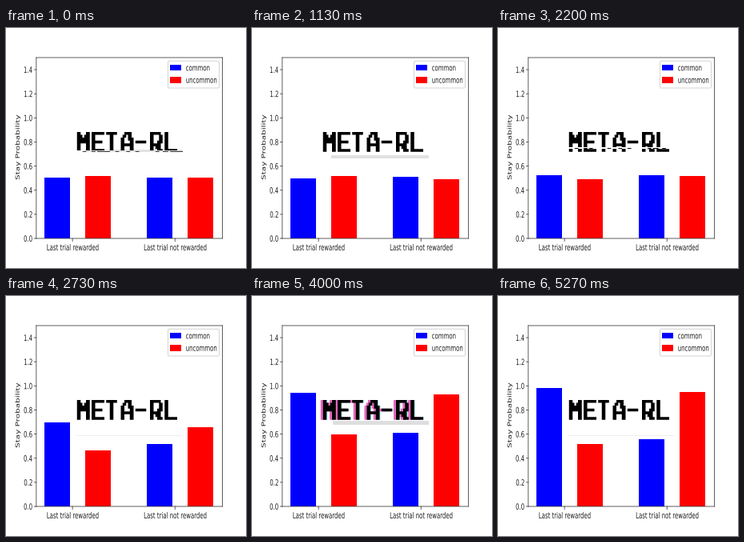
A matplotlib script for the animation above (5340 ms loop, 300 px wide and 300 px high).

```python
import numpy as np
import matplotlib.pyplot as plt
from matplotlib.animation import FuncAnimation
from matplotlib.patches import FancyBboxPatch, PathPatch, Rectangle
from matplotlib.textpath import TextPath
from matplotlib.transforms import Affine2D

LOOP, TICK, STEPS = 5340, 20, 80
W, H = 432, 288                      # a 3:2 chart shown on a square stage
SX, SY = W / 300, H / 300            # chart units per stage pixel
LEFT, RIGHT, BOTTOM, TOP = 54.5, 389.5, 35.5, 252.5
UNIT = (TOP - BOTTOM) / 1.5          # height of probability 1
INK, EDGE = "0.12", "0.25"

fig = plt.figure(figsize=(3, 3), dpi=100, facecolor="white")
ax = fig.add_axes([0, 0, 1, 1])
ax.axis("off")


def label(x, y, text, align=0.0, turn=0):
    path = TextPath((0, 0), text, size=10, prop={"family": "DejaVu Sans"})
    width = path.get_extents().x1
    move = Affine2D().translate(-align * width, 0).rotate_deg(turn).translate(x, y)
    ax.add_patch(PathPatch(move.transform_path(path), fc=INK, lw=0, zorder=4))


def line(x0, y0, x1, y1):
    ax.plot([x0, x1], [y0, y1], color=EDGE, lw=0.6, snap=False,
            solid_capstyle="projecting", zorder=3)


def block(x, y, w, h, color, **kw):
    return ax.add_patch(Rectangle((x, y), w, h, fc=color, lw=0, **kw))


# Frame, ticks and labels
for y in (BOTTOM, TOP):
    line(LEFT, y, RIGHT, y)
for x in (LEFT, RIGHT):
    line(x, BOTTOM, x, TOP)
for k in range(8):
    y = BOTTOM + 0.2 * k * UNIT
    line(LEFT - 3.5, y, LEFT, y)
    label(47, y - 3.8, f"{0.2 * k:.1f}", align=1)
for x, text in ((119.7, "Last trial rewarded"), (304.2, "Last trial not rewarded")):
    line(x, BOTTOM - 3.5, x, BOTTOM)
    label(x, 21.2, text, align=0.5)
label(24.2, 144.7, "Stay Probability", align=0.5, turn=90)

# Legend
ax.add_patch(FancyBboxPatch((291.6, 216), 92.2, 32.4, fc="white", ec="0.8", lw=0.6,
                            boxstyle="round,pad=0,rounding_size=2", zorder=3))
for y, color, text in ((236.8, "blue", "common"), (222.1, "red", "uncommon")):
    block(295.6, y, 20, 7, color, zorder=4)
    label(323.6, y, text)

# Key steps, with the probability of each bar and the distance swept by the beam
KEYS = [0, 17, 33, 49, 60, 67, 79]
LEVELS = [
    [.505, .495, .525, .87, .94, .96, .98],
    [.52, .52, .49, .445, .595, .545, .52],
    [.505, .51, .525, .515, .61, .56, .56],
    [.505, .49, .52, .79, .93, .93, .95],
]
SWEPT = [24, 79, 116, 164, 172, 210, 236]
SWEEP_TOP, SWEEP = 130, 48           # the beam starts again after each sweep

bars = [block(69.2 + 184.5 * group + 73.8 * side, BOTTOM, 46.1, 0, color, zorder=2)
        for group in range(2) for side, color in enumerate(("blue", "red"))]

# Block letters as pen strokes on a grid of 8 by 7 cells
STROKES = {
    "M": [[(0, 6), (0, 0), (2.5, 3), (5, 0), (5, 6)]],
    "E": [[(5, 0), (0, 0), (0, 6), (5, 6)], [(0, 3), (4, 3)]],
    "T": [[(0, 0), (4, 0)], [(2, 0), (2, 6)]],
    "A": [[(0, 6), (0, 2), (2, 0), (3, 0), (5, 2), (5, 6)], [(0, 4), (5, 4)]],
    "-": [[(0, 3), (4, 3)]],
    "R": [[(0, 6), (0, 0), (4, 0), (5, 1), (5, 2), (4, 4), (0, 4)], [(2, 4), (5, 6)]],
    "L": [[(0, 0), (0, 6), (5, 6)]],
}
X0, X1, Y0, Y1 = 82, 226, 127, 158   # title area in stage pixels


def letter_grid(text):
    grid = np.zeros((9, 8 * len(text) + 2))
    for n, char in enumerate(text):
        for stroke in STROKES[char]:
            for a, b in zip(stroke, stroke[1:]):
                for x, y in np.linspace(a, b, 25).round().astype(int):
                    left = 8 * n + x + 1
                    grid[y + 1, left:left + 2] = 1
    return grid


def title_mask(text, x, y, cell_w, cell_h, fine=4):
    """Ink coverage of the title for each pixel of its area."""
    grid = letter_grid(text)
    px = X0 + (np.arange((X1 - X0) * fine) + 0.5) / fine
    py = Y0 + (np.arange((Y1 - Y0) * fine) + 0.5) / fine
    cols = np.clip((px - x) // cell_w + 1, 0, grid.shape[1] - 1).astype(int)
    rows = np.clip((py - y) // cell_h + 1, 0, 8).astype(int)
    ink = grid[rows][:, cols]
    return ink.reshape(Y1 - Y0, fine, X1 - X0, fine).mean(axis=(1, 3))


MASK = title_mask("META-RL", 88.7, 130, 2.28, 3.55)
PINK, CYAN, BLACK = (0.9, 0.4, 0.75), (0.55, 0.88, 0.86), (0, 0, 0)

title = ax.imshow(np.ones(MASK.shape + (3,)), aspect="auto", interpolation="nearest",
                  extent=(X0 * SX, X1 * SX, H - Y1 * SY, H - Y0 * SY), zorder=5)
beam = block(0, 0, 0, 0, "black", zorder=6)
ax.set(xlim=(0, W), ylim=(0, H))


def draw_title(step, y):
    ink = MASK.copy()
    row = int(round(y)) - Y0
    if y < 155:                      # torn strip under the beam
        ink[row] = np.roll(ink[row], 7)
        ink[row - 1] = 0
    split = round(3 * np.exp(-abs(step - 60) / 8))
    layers = [(CYAN, 1), (PINK, -split)] if split else []
    rgb = np.ones(ink.shape + (3,))
    for color, shift in layers + [(BLACK, 0)]:
        cover = np.roll(ink, shift, axis=1)[..., None]
        rgb = rgb * (1 - cover) + np.array(color) * cover
    title.set_data(rgb)


def draw_beam(y):
    away = abs(y - 158)
    thick = max(1, round(5 - away / 2))
    x, top = 101 - 0.8 * away, round(y - thick / 2)
    beam.set_bounds(x * SX, H - (top + thick) * SY, (221 - x) * SX, thick * SY)
    beam.set_alpha(0.13 - 0.004 * min(away, 20))
    beam.set_visible(y > 153)


def update(frame):
    step = min(STEPS - 1, int((frame * TICK + 14) * 15 / 1000))
    for bar, levels in zip(bars, LEVELS):
        bar.set_height(np.interp(step, KEYS, levels) * UNIT)
    y = SWEEP_TOP + np.interp(step, KEYS, SWEPT) % SWEEP
    draw_title(step, y)
    draw_beam(y)
    return [*bars, title, beam]


anim = FuncAnimation(fig, update, frames=LOOP // TICK, interval=TICK,
                     repeat=True, repeat_delay=0, blit=False)
plt.show()
```
